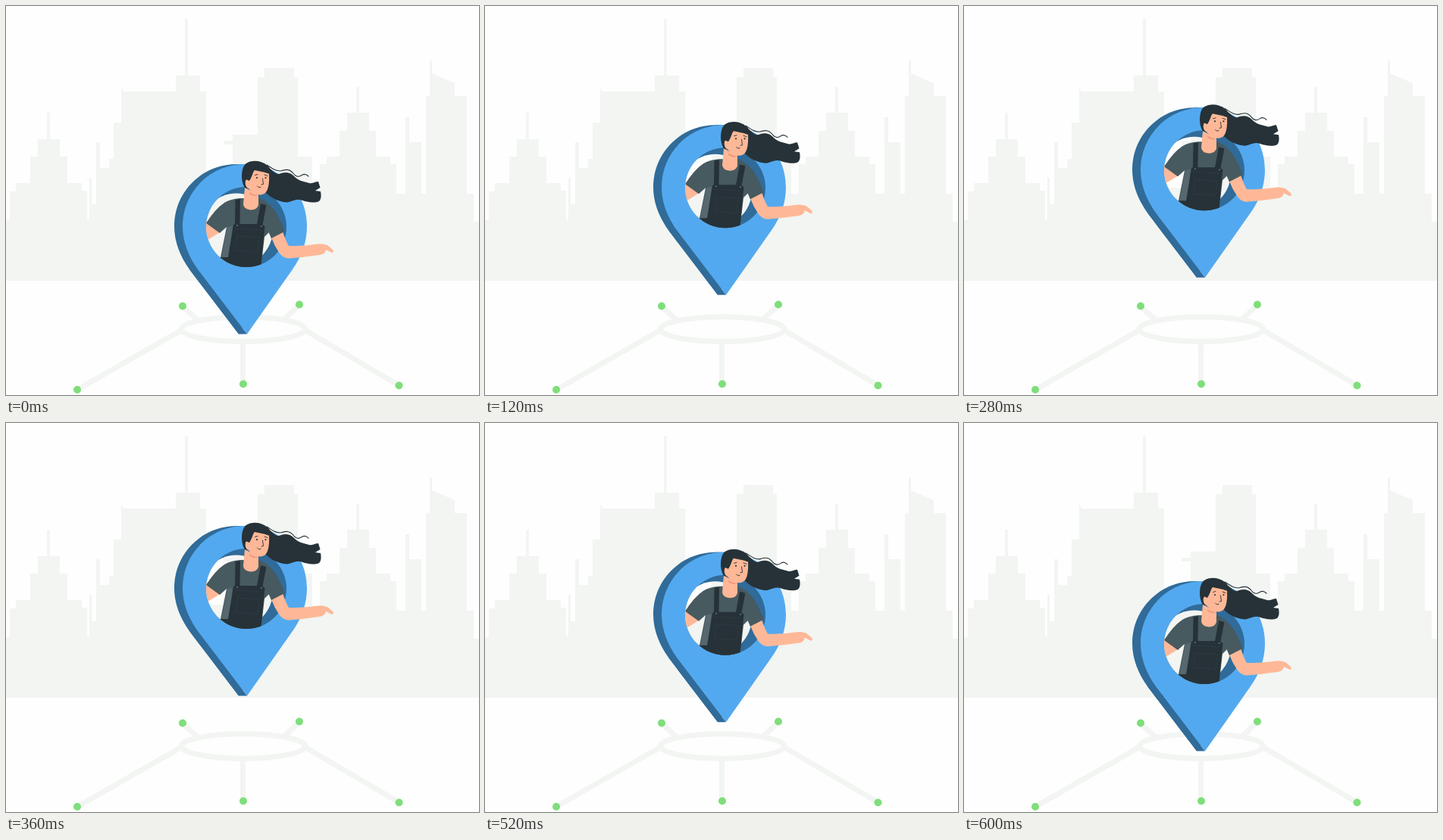
Write an HTML page that moves like this. It is 624 by 514 pixels and loops after 620 ms.

```html
<!DOCTYPE html>
<html lang="en">
<head>
<meta charset="utf-8">
<title>Bouncing map pin</title>
<style>
  html, body { margin: 0; width: 100%; height: 100%; overflow: hidden; background: #fdfefd; }
  svg { display: block; width: 624px; height: 514px; }
  .city { fill: #f2f5f2; }
  .road { fill: none; stroke: #f2f5f2; stroke-width: 7; }
  .dot { fill: #7fde7b; }
  .front { fill: #53a9ef; }
  .side { fill: #306b99; }
  .skin { fill: #feb897; }
  .shirt { fill: #475a60; }
  .dark { fill: #263238; }
  .line { fill: none; stroke: #263238; stroke-linecap: round; }
  .stitch { fill: none; stroke: #3a474e; stroke-width: .7; stroke-dasharray: 2 2; }
</style>
</head>
<body>
<svg viewBox="0 0 624 514">
  <defs>
    <path id="drop" d="M315 209C361 209 397 245 397 291C397 312 390 331 378 348L318 433.500L253 348C241 331 233 312 233 291C233 245 270 209 315 209Z"/>
    <clipPath id="hole"><circle cx="317" cy="292" r="53"/></clipPath>
  </defs>

  <g class="city">
    <path d="M0 363V283H5V245H13V234H32V199H42V176H54V141H58V176H71V199H81V234H100V244H107V282H110V227H113V262H119V180H124V214H136V202H142V154H152V107L155 113H224V92H236V17H240V92H256V113H264V363Z"/>
    <path d="M264 363V240H299V183H287V178H299V170H332V94H341V82H380V94H385V199H404V248H414V363Z"/>
    <path d="M414 363V209H423V199H440V165H450V141H462V107H466V141H479V165H488V199H507V209H515V248H527V147H532V180H548V248H554V119H559V72H562V89L592 102V119H608V248H617V285H624V363Z"/>
  </g>

  <g class="road">
    <path d="M94 507L232 428M518 501L394 428M312.500 499V444M233 397L254 416M387 395L367 414"/>
    <ellipse cx="313" cy="427" rx="81.500" ry="16.300"/>
  </g>
  <g class="dot">
    <circle cx="94" cy="507" r="5"/><circle cx="233" cy="396.500" r="5"/>
    <circle cx="313" cy="499.500" r="5"/><circle cx="387" cy="394.500" r="5"/>
    <circle cx="518.500" cy="501.500" r="5"/>
  </g>

  <g id="pin">
    <!-- pin body, with the hole cut through both faces -->
    <mask id="cut" maskUnits="userSpaceOnUse" x="200" y="190" width="220" height="260">
      <path d="M200 190H420V450H200Z" fill="#fff"/>
      <circle cx="304" cy="295.500" r="48" clip-path="url(#hole)" fill="#000"/>
    </mask>
    <g mask="url(#cut)">
      <use href="#drop" x="-11" class="side"/>
      <path class="side" d="M304 209H315V240H304ZM242 348H253L318 433.500H307Z"/>
      <use href="#drop" class="front"/>
      <circle cx="317" cy="292" r="53" class="side"/>
    </g>

    <!-- torso -->
    <g clip-path="url(#hole)">
      <path class="skin" d="M264 283L284 298Q276 303 266 309H255Z"/>
      <path class="shirt" d="M309 254Q296 255 288 260Q276 268 264 287L282 300L291 292L283 332L300 348H336L341 305L348 298L350 307L367 298Q361 281 354 270Q345 258 334 254Z"/>
      <path d="M292 292L299 290L294 334H284Z" fill="#56686e"/>
      <path class="dark" d="M302.500 256L309 255L308.500 288H331L336 261L343.500 263L338.500 289L341.500 291L336 348H280V332H293L300 289L302 288Z"/>
      <path class="stitch" d="M302 294L338 296M305 304L334 306L332 325L303 323Z"/>
    </g>
    <g fill="#65747b"><circle cx="305" cy="290" r="1"/><circle cx="337" cy="291" r="1"/></g>

    <!-- pointing arm -->
    <path class="skin" d="M350 306L365 298Q369 310 373 317Q392 317 407 315Q417 313 424 316L431 322Q433 325 430 326L422 322Q421 328 413 329Q393 332 373 333.500Q366 333 361 327Q354 317 350 306Z"/>
    <path class="shirt" d="M343 262Q350 265 354 270Q363 284 367.500 298L350 307L343 291Z"/>

    <!-- hair behind the face -->
    <path class="dark" d="M345 213C352 216 354 222 360 222C367 219 374 219 379 224C385 231 393 232 400 234C405 235 408 232 412 232L414.500 240L408 244L415 245C416 250 416 255 413 258C406 261 397 259 390 256.500C383 254 378 258 371 259.500C360 259 350 254 342 246Z"/>
    <path class="line" stroke-width="1.100" d="M344 210C352 215 355 218 362 218C370 216 373 215 378 220C383 227 387 226 391 223Q395 221 399 225"/>
    <path class="dark" d="M316 241C309 233 310 214 316 208.500C325 202.500 336 204.500 343 209.500Q349 213 350 221L344 239L322 241Z"/>

    <!-- face and neck -->
    <path class="skin" d="M315 240L333 249V263Q331 269.500 323 269.500Q314 269 313 262Z"/>
    <path class="skin" d="M321 228C324 226 325 220 328 217L347 221C347.500 230 347 241 343 246C338 252 327 250 320 241C315 240 314 229 319 228Z"/>
    <path class="dark" d="M321 231Q325 225 327 216L333 213Q340 220 348 222L350 219L341 208L320 210L314 228Z"/>
    <path d="M321 246Q326 250 333 250Q327 253 321 248Z" fill="#ee9575"/>
    <g class="line" stroke-width=".9">
      <path d="M328.500 223.500L332 222.500M341 223L345 224.500M338.500 228L339.500 235.500L337 236M331.500 238Q333 241 336 239.500"/>
    </g>
    <g class="dark"><circle cx="331" cy="227" r="1.100"/><circle cx="342.500" cy="227" r="1.100"/></g>
  </g>
</svg>
<script>
  const LOOP = 620, FLIGHT = 600, STEP = 20, HEIGHT = 74.8, POWER = 2.3;
  const pin = document.getElementById('pin');
  const start = performance.now();

  // Jump arc: fast at the ground, slow at the top.
  const lift = t => HEIGHT * (1 - Math.abs(1 - t / (FLIGHT / 2)) ** POWER);

  function draw(now) {
    const t = Math.floor(Math.max(0, now - start) % LOOP / STEP) * STEP;
    pin.setAttribute('transform', `translate(0 ${-lift(t).toFixed(2)})`);
    requestAnimationFrame(draw);
  }
  draw(start);
</script>
</body>
</html>
```
